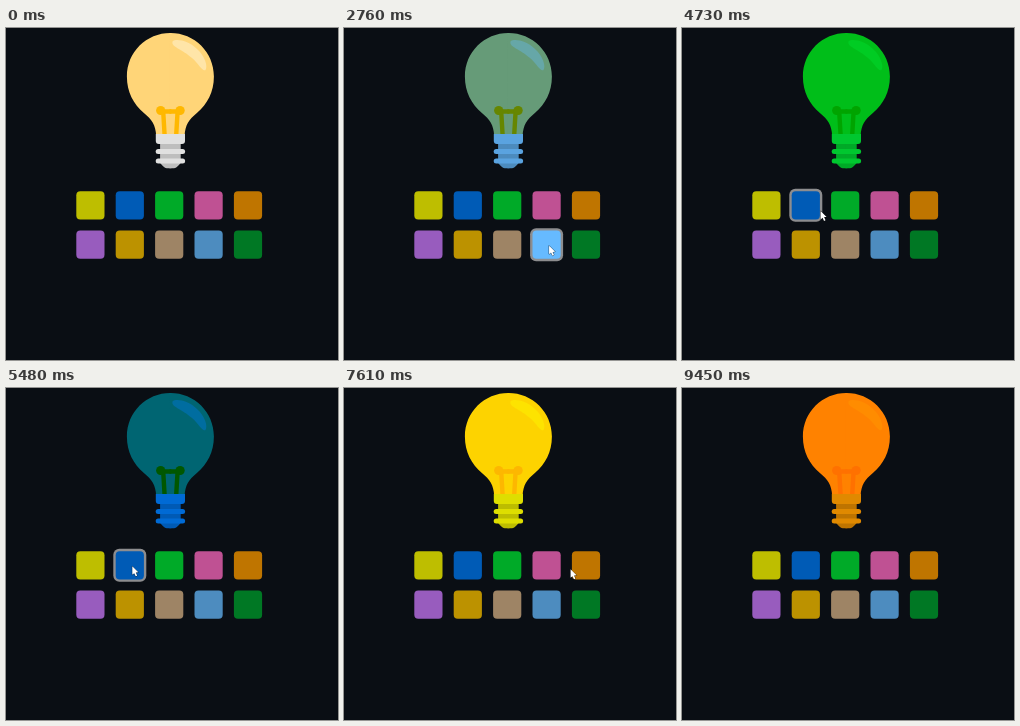
Write an HTML page with a canvas that moves like this. It is 332 px wide and 332 px high and loops after 9.48 s.

```html
<!DOCTYPE html>
<html lang="en">
<head>
<meta charset="utf-8">
<title>Colour bulb</title>
<style>
html, body { margin: 0; width: 100%; height: 100%; overflow: hidden; background: #0a0e14; }
canvas { display: block; width: 100vw; height: 100vh; }
</style>
</head>
<body>
<canvas id="stage"></canvas>
<script>
const SIZE = 332, LOOP = 9480, AXIS = 164.4;
const canvas = document.getElementById('stage');
const ctx = canvas.getContext('2d');

const toColor = hex => [1, 3, 5].map(i => parseInt(hex.slice(i, i + 2), 16));
const COLORS = [
  '#fdfd00', '#0079f3', '#00e335', '#ff6cc4', '#ff9c00',
  '#ca7afd', '#fac200', '#d2b087', '#66baff', '#00a030'
].map(toColor);
const DIM = 0.75; // brightness of an idle button

const BTN = 28.2, STEP = 39.4, LEFT = 70.3, TOP = 163.2;
const corner = id => ({ x: LEFT + id % 5 * STEP, y: TOP + Math.floor(id / 5) * STEP });
const aim = id => {
  const { x, y } = corner(id);
  return { x: x + BTN / 2 + 2.5, y: y + BTN / 2 + 1 };
};

const HOLD = 400, TRAVEL = 400, FADE = 180, SAG = 5;
const CLICKS = [[9, 1620], [8, 2540], [5, 3420], [2, 4080], [1, 4880], [3, 5880], [0, 6890], [4, 7695]]
  .map(([id, down]) => ({ id, down, up: down + HOLD }));

// The pointer rests at each stop from arrive to leave.
const STOPS = [
  { x: 88, y: 274, arrive: 500, leave: 500 },
  { ...aim(5), arrive: 900, leave: 900 },
  ...CLICKS.map(c => ({ ...aim(c.id), arrive: c.down, leave: c.up })),
  { x: 20, y: 332, arrive: 8620, leave: 8620 }
];

const mix = (a, b, p) => a + (b - a) * p;
const clamp = p => Math.max(0, Math.min(1, p));
const smooth = p => p * p * (3 - 2 * p);
const mixColor = (a, b, p) => a.map((v, i) => mix(v, b[i], p));
const rgb = c => `rgb(${c.map(Math.round).join(',')})`;

function pointerAt(t) {
  const i = STOPS.findIndex(s => s.arrive > t);
  if (i < 1) return null;
  const a = STOPS[i - 1], b = STOPS[i];
  const start = Math.max(a.leave, b.arrive - TRAVEL);
  const p = clamp((t - start) / (b.arrive - start)), s = smooth(p);
  return { x: mix(a.x, b.x, s), y: mix(a.y, b.y, s) + SAG * Math.sin(Math.PI * p) };
}

const tintAt = t => CLICKS.reduce(
  (tint, c) => mixColor(tint, COLORS[c.id], smooth(clamp((t - c.down) / FADE))),
  [255, 255, 255]
);

function glow(id, t) {
  const c = CLICKS.find(click => click.id === id);
  return c ? clamp((t - c.down) / 60) - clamp((t - c.up) / 60) : 0;
}

function fillBox(x, y, w, h, r) {
  ctx.beginPath();
  ctx.roundRect(x, y, w, h, r);
  ctx.fill();
}

// Half shapes, mirrored around the bulb axis
const GLASS = new Path2D(`M0 5 C24 5 43.5 24 43.5 48.5 C43.5 64 37 76 26.5 85
  C18.5 91.5 14.7 97 14.2 108 L-1 108 L-1 5 Z`);
const SCREW = new Path2D('M-1 110 H10.3 V135 Q6 140.3 3.5 140.3 H-1 Z');
const WIRE = new Path2D('M-1 83.5 H7.2 L5.8 107');
const SHINE = new Path2D(`M166.5 13.5 C170 10 183 13 191 21 C199 28 202 38 199.5 42
  C196 43.5 193 36 186 30 C176 21 165 19 166.5 13.5 Z`);
const ARROW = new Path2D('M0 0 V8.5 L1.9 6.8 L3.4 10 L4.9 9.3 L3.5 6.2 L6 6 Z');

function mirrored(paint) {
  for (const side of [-1, 1]) {
    ctx.save();
    ctx.translate(AXIS, 0);
    ctx.scale(side, 1);
    paint();
    ctx.restore();
  }
}

function drawBulb(tint) {
  const shade = hex => rgb(toColor(hex).map((v, i) => v * tint[i] / 255));

  ctx.fillStyle = shade('#ffd578');
  mirrored(() => ctx.fill(GLASS));
  ctx.fillStyle = shade('#ffe5a8');
  ctx.fill(SHINE);

  ctx.strokeStyle = ctx.fillStyle = shade('#ffb800');
  ctx.lineWidth = 4.4;
  mirrored(() => {
    ctx.stroke(WIRE);
    fillBox(5.1, 77.9, 9.2, 9.2, 4.6);
  });

  ctx.fillStyle = shade('#bebebe');
  mirrored(() => ctx.fill(SCREW));
  ctx.fillStyle = shade('#e0e0e0');
  fillBox(AXIS - 14.6, 106, 29.2, 10, [0, 0, 3, 3]);
  for (const y of [121, 130.5]) fillBox(AXIS - 14.7, y, 29.4, 5, 2.5);
}

function drawButton(id, t, pointer) {
  const { x, y } = corner(id);
  const reach = BTN / 2 + 1;
  const hover = pointer &&
    Math.abs(pointer.x - x - BTN / 2) < reach && Math.abs(pointer.y - y - BTN / 2) < reach;
  if (hover) {
    ctx.fillStyle = '#8d8d8f';
    fillBox(x - 2.4, y - 2.4, BTN + 4.8, BTN + 4.8, 6);
  }
  const level = mix(DIM, 1, glow(id, t));
  ctx.fillStyle = rgb(COLORS[id].map(v => v * level));
  fillBox(x, y, BTN, BTN, 4);
}

function drawPointer({ x, y }) {
  ctx.save();
  ctx.translate(x, y);
  ctx.lineJoin = 'round';
  ctx.lineWidth = 1;
  ctx.strokeStyle = 'rgba(0,0,0,0.6)';
  ctx.stroke(ARROW);
  ctx.fillStyle = '#fff';
  ctx.fill(ARROW);
  ctx.restore();
}

function draw(t) {
  const ratio = window.devicePixelRatio || 1;
  const w = Math.round(innerWidth * ratio), h = Math.round(innerHeight * ratio);
  if (canvas.width !== w || canvas.height !== h) {
    canvas.width = w;
    canvas.height = h;
  }
  ctx.setTransform(w / SIZE, 0, 0, h / SIZE, 0, 0);
  ctx.fillStyle = '#0a0e14';
  ctx.fillRect(0, 0, SIZE, SIZE);
  const pointer = pointerAt(t);
  drawBulb(tintAt(t));
  COLORS.forEach((_, id) => drawButton(id, t, pointer));
  if (pointer) drawPointer(pointer);
}

const start = performance.now();
function tick() {
  draw((performance.now() - start) % LOOP);
  requestAnimationFrame(tick);
}
tick();
</script>
</body>
</html>
```
